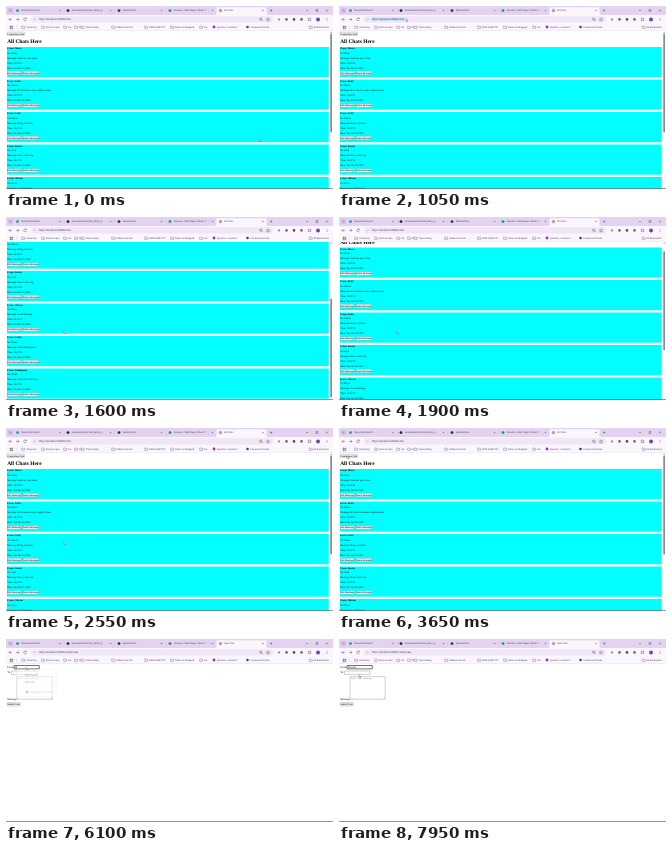
Write an HTML page that moves like this. It is 327 px wide and 183 px high and loops after 8000 ms.

```html
<!DOCTYPE html>
<html lang="en">
<head>
<meta charset="utf-8">
<title>All Chats</title>
<style>
  html, body { margin: 0; width: 100%; height: 100%; overflow: hidden; background: #fff; }
  svg { display: block; width: 327px; height: 183px; text-rendering: geometricPrecision; }
  text { white-space: pre; }
  .ui { font-family: "Open Sans", "Noto Sans", sans-serif; fill: #35303c; }
  .page { font-family: "Liberation Serif", serif; fill: #000; }
  .ctl { font-family: "Liberation Sans", sans-serif; fill: #000; }
  .mono { font-family: "Liberation Mono", monospace; fill: #777; }
</style>
</head>
<body>
<svg id="stage" viewBox="0 0 327 183"></svg>
<script>
const LOOP = 8000, PITCH = 32.5, MAX_SCROLL = 84.5;

const text = (x, y, s, size = 2.72, cls = "page", extra = "") =>
  `<text x="${x}" y="${y}" font-size="${size}" class="${cls}" ${extra}>${s}</text>`;
const rect = (x, y, w, h, fill, extra = "") =>
  `<rect x="${x}" y="${y}" width="${w}" height="${h}" fill="${fill}" ${extra}/>`;
const dot = (x, y, r, fill, extra = "") =>
  `<circle cx="${x}" cy="${y}" r="${r}" fill="${fill}" ${extra}/>`;
const line = (d, color = "#49434f", w = 0.45) =>
  `<path d="${d}" fill="none" stroke="${color}" stroke-width="${w}"/>`;
const cross = (x, y, r) =>
  line(`M${x - r} ${y - r}l${2 * r} ${2 * r}M${x + r} ${y - r}l${-2 * r} ${2 * r}`);
const button = (x, y, w, label) =>
  rect(x, y, w, 3.5, "#efefef", 'rx=".5" stroke="#767676" stroke-width=".25"') +
  text(x + w / 2, y + 2.5, label, 2.2, "ctl", 'text-anchor="middle"');

// Browser frame
const tabs = [
  [11.5, "Nova Dashboard", "#12a58c"],
  [62, "tarunvale/minichat_demo_js", "#24292f"],
  [113, "SketcherDoc", "#333"],
  [164, "Sonvara - Web Player: Music f", "#17a349"]
];
const marks = [
  [20, "University"], [40, "Zentra maps"], [62, "Gis"], [73, "AI"], [79.5, "Transcoding"],
  [110, "VidNest Format"], [143, "DATA SHEET DT"], [169, "Notes on Mapped"], [198, "Gis"],
  [211, "Quartzo - London F"], [244.5, "Fernwick AI Tasks -"]
];

function chrome() {
  let s = rect(0, 0, 327, 9, "#e3d3f1") +
    '<path d="M209 9q1.5 0 1.5-1.5V2.6q0-1.4 1.5-1.4h47q1.5 0 1.5 1.4v4.9q0 1.5 1.5 1.5z" fill="#fbf5fe"/>' +
    rect(0, 9, 327, 16, "#fbf5fe") + rect(0, 24.7, 327, 0.3, "#e0d6e6") +
    rect(2, 2, 5, 5, "#d3bfe8", 'rx="1.2"') + line("M3.6 4l.9.9.9-.9");
  for (const [x, label, color] of tabs) {
    s += dot(x, 4.6, 1.4, color) + text(x + 3.7, 5.4, label, 2.35, "ui") + cross(x + 42.5, 4.5, 0.65);
    if (x < 160) s += rect(x + 46.5, 3, 0.25, 3.2, "#b5a3c6");
  }
  s += dot(214.5, 4.6, 1.3, "none", 'stroke="#57505f" stroke-width=".45"') +
    line("M213.2 4.6h2.6M214.5 3.3v2.6", "#57505f", 0.3) +
    text(218, 5.4, "", 2.35, "ui", 'id="tab"') + cross(257, 4.5, 0.65) +
    line("M264 4.5h2.4M265.2 3.3v2.4") +
    line("M300 4.5h2M310 3.6h1.8v1.8h-1.8z") + cross(321, 4.5, 0.9);

  // Toolbar
  s += line("M6 13.4H3M4.4 12L3 13.4l1.4 1.4M10 13.4h3M11.6 12l1.4 1.4-1.4 1.4M20.3 12.6a1.4 1.4 0 1 0 .1 1.3M20.5 11.8v1h-1") +
    rect(25, 10.2, 242, 6.4, "#f0e6f6", 'rx="3.2"') +
    dot(28.8, 13.4, 1.7, "#fff") + dot(28.8, 13.4, 0.7, "none", 'stroke="#555" stroke-width=".35"') +
    rect(32.5, 11.6, 35.5, 3.6, "#cfe0fb", 'id="mark"') +
    text(33, 14.3, "", 2.65, "ui", 'id="url"') +
    dot(254.7, 13.2, 1.1, "none", 'stroke="#49434f" stroke-width=".45"') + line("M255.5 14l1 1") +
    line("M262 11.9l.5 1.1 1.2.1-.9.8.3 1.2-1.1-.7-1.1.7.3-1.2-.9-.8 1.2-.1z", "#49434f", 0.35) +
    dot(273, 13.4, 1.2, "#999") + dot(280.5, 13.4, 1.3, "#6c6775") + dot(288, 13.4, 1.3, "#55504f") +
    dot(295.5, 13.4, 1.3, "#8a6072") + line("M302.3 12.2h2.4v2.4h-2.4z") +
    dot(312, 13.4, 2, "#7444a8") +
    dot(321, 12.2, 0.35, "#444") + dot(321, 13.4, 0.35, "#444") + dot(321, 14.6, 0.35, "#444");

  // Bookmarks
  s += line("M4 20h1v1h-1zM5.8 20h1v1h-1zM4 21.8h1v1h-1zM5.8 21.8h1v1h-1z") + rect(10.5, 19.3, 0.3, 3.6, "#cbbcd6");
  for (const [x, label] of marks) {
    if (x === 211) s += dot(208, 21, 1.4, "#a12bc2");
    else if (x > 240) s += dot(241.5, 21, 1.3, "#4a4450");
    else s += line(`M${x - 4.3} 19.9h1l.4.5h1.5v2h-2.9z`, "#57505f", 0.35);
    s += text(x, 21.9, label, 2.3, "ui");
  }
  return s + line("M303.3 19.9h1l.4.5h1.5v2h-2.9z", "#57505f", 0.35) +
    text(307.5, 21.9, "All Bookmarks", 2.3, "ui");
}

// Chat list
const chats = [
  ["Meera", "Rohit", "Send me your notes", "23:07:11"],
  ["Rohit", "Meera", "Hi! teach me some english please", "23:07:11"],
  ["Ankit", "Meera", "Bring me fruits", "23:07:11"],
  ["Kavita", "Joyti", "Have a nice trip", "23:07:11"],
  ["Vikram", "Priya", "Good Morning", "23:07:11"],
  ["Sudhir", "Tanya", "Implementing now", "23:07:11"],
  ["Ramkumar", "Nisha", "Great! Have fun too", "23:07:11"]
];

function card([from, to, message, time], i) {
  const y = 41 + i * PITCH;
  const rows = ["To: " + to, "Message: " + message, "Time: " + time, "Date: Tue Dec 05 2023"];
  return rect(1, y, 321.7, 30.2, "#0ff") +
    text(1.3, y + 2, "From: " + from, 2.5, "page", 'font-weight="700"') +
    rows.map((row, k) => text(1.3, y + 6.9 + k * 4.95, row, 2.5)).join("") +
    button(1.3, y + 24.3, 13.8, "Edit Message") + button(16.6, y + 24.3, 16.2, "Delete Message");
}

const list = '<g id="list"><g id="scroll">' + button(1, 26, 17.5, "Create New Chat") +
  text(1.2, 37, "All Chats Here", 5.4, "page", 'font-weight="700"') +
  chats.map(card).join("") + "</g>" +
  rect(323.2, 25, 3.8, 158, "#fcfcfc") + rect(324.3, 27.5, 1.7, 99, "#8b8b8b", 'rx=".8" id="thumb"') +
  '<path d="M324.3 26.8l.85-1 .85 1z" fill="#777"/></g>';

// New chat form
const field = (x, y, w, h, id) =>
  rect(x, y, w, h, "#fff", `id="${id}" stroke="#767676" stroke-width=".35" rx=".3"`);
const form = '<g id="form">' + text(1.2, 29, "From:") + field(8, 26.5, 25.3, 3.4, "from") +
  text(8.7, 28.9, "", 2.25, "ctl", 'id="typed"') + rect(9, 27, 0.3, 2.4, "#000", 'id="caret"') +
  text(1.2, 34.3, "To:") + field(5.5, 32, 25.5, 3.4, "to") +
  field(11, 37.6, 35.2, 22.6, "area") + text(11.8, 39.9, "Enter Your message", 1.95, "mono") +
  line("M44.6 59.8l1.2-1.2M45.3 59.8l.5-.5", "#777", 0.25) +
  text(1.2, 60.5, "Message:") + button(1.2, 63.6, 13, "Submit Form") +
  '<g id="popup">' + rect(10.5, 30.4, 39.5, 27.8, "#fff", 'rx="1.5" stroke="#d5d2da" stroke-width=".35"') +
  text(19, 37.3, "Ramkumar", 2.6, "ui") + text(19, 44.3, "Ramesh", 2.6, "ui") +
  rect(11, 48.5, 38.5, 0.25, "#e2dfe6") + dot(21, 53, 1.5, "#8797cc") +
  text(25, 54, "Manage addresses...", 2.5, "ui", 'style="fill:#7a8bcc"') + "</g></g>";

document.getElementById("stage").innerHTML = rect(0, 0, 327, 183, "#fff") + list + form + chrome() +
  rect(0, 182.3, 327, 0.7, "#6a6a6a") +
  '<path id="mouse" d="M0 0v2.9l.7-.6.5 1.1.5-.2-.5-1.1h.9z" fill="#fff" stroke="#222" stroke-width=".25"/>';

// Motion: each row is a time followed by values
const scrollSteps = [[1150, 0], [1550, MAX_SCROLL], [1680, MAX_SCROLL], [1900, 10.5], [2000, 0]];
const mouseSteps = [[0, 253, 133], [150, 253, 133], [850, 67, 12.5], [1080, 67, 12.5], [1250, 58, 114],
  [2650, 58, 114], [3350, 8, 28], [4300, 8, 28], [4950, 20, 28], [7050, 20, 28], [7500, 20, 35.5]];
const popupSteps = [[5150, 0], [5350, 1], [5950, 1], [6100, 0.5], [6250, 0]];

function at(steps, t) {
  if (t <= steps[0][0]) return steps[0].slice(1);
  const i = steps.findIndex(row => row[0] > t);
  if (i < 0) return steps[steps.length - 1].slice(1);
  const a = steps[i - 1], b = steps[i], p = (t - a[0]) / (b[0] - a[0]), e = p * p * (3 - 2 * p);
  return a.slice(1).map((v, k) => v + (b[k + 1] - v) * e);
}

const el = {};
document.querySelectorAll("[id]").forEach(node => el[node.id] = node);
const set = (id, name, value) => el[id].setAttribute(name, value);
const show = (id, on) => set(id, "visibility", on ? "inherit" : "hidden");
const write = (id, s) => { if (el[id].textContent !== s) el[id].textContent = s; };

function draw(t) {
  const onForm = t >= 4220, focused = t >= 5000;
  const [scroll] = at(scrollSteps, t), [x, y] = at(mouseSteps, t);
  show("list", !onForm);
  show("form", onForm);
  set("scroll", "transform", `translate(0 ${-scroll})`);
  set("thumb", "y", 27.5 + scroll * 54 / MAX_SCROLL);
  set("mouse", "transform", `translate(${x} ${y})`);
  write("tab", onForm ? "New Chat" : "All Chats");
  write("url", "http://localhost:8080/" + (onForm ? "chats/new" : "chat"));
  show("mark", t >= 900 && t < 1120);

  const count = t < 5600 ? 0 : t < 6500 ? 1 : Math.min(6, 2 + Math.floor((t - 6500) / 85));
  write("typed", "Ramesh".slice(0, count));
  set("from", "stroke", focused ? "#101010" : "#767676");
  set("from", "stroke-width", focused ? 0.6 : 0.35);
  set("caret", "x", 8.9 + count * 1.2);
  show("caret", focused && onForm && t < 7000 && t % 1000 < 500);
  set("popup", "opacity", at(popupSteps, t)[0]);
}

const start = performance.now();
function tick() {
  draw((performance.now() - start) % LOOP);
  requestAnimationFrame(tick);
}
draw(0);
requestAnimationFrame(tick);
</script>
</body>
</html>
```
